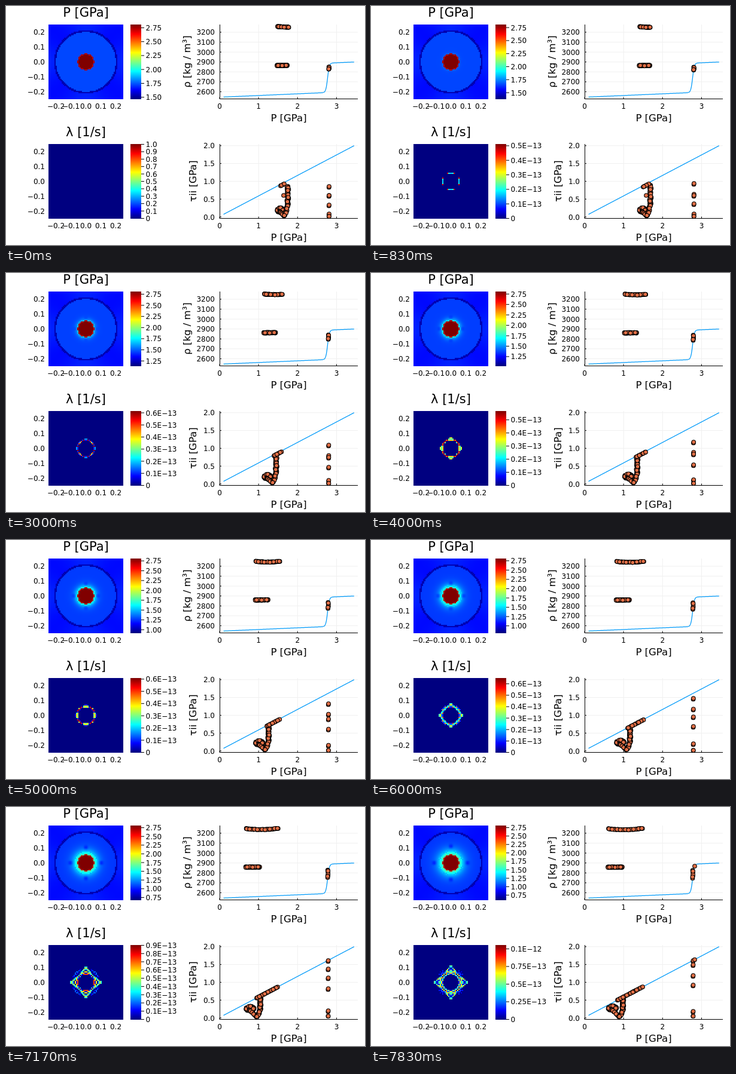
Write an HTML page with a canvas that moves like this. It is 600 by 400 pixels and loops after 8 s.

```html
<!DOCTYPE html>
<html lang="en">
<head>
<meta charset="utf-8">
<title>Pressure, density and stress</title>
<style>
  html, body { margin: 0; width: 100%; height: 100%; overflow: hidden; background: #fff; }
  canvas { display: block; width: 600px; height: 400px; }
</style>
</head>
<body>
<canvas id="stage" width="600" height="400"></canvas>
<script>
const ctx = document.getElementById('stage').getContext('2d');
const LOOP = 8000, STEPS = 48, N = 62;
const FONT = 'px "DejaVu Sans", sans-serif';

// Values at the steps listed in KEYS, linear in between.
const KEYS = [0, 5, 12, 24, 36, 43, 47];
const TRACKS = {
  pMin: [1.47, 1.38, 1.25, 1.027, 0.81, 0.68, 0.607],
  column: [471, 467, 458, 445, 433, 425, 421],
  columnTop: [302, 300, 302, 308, 315, 318, 320],
  ringRight: [473, 467, 465, 460, 457, 456, 455],
  yieldLeft: [459, 455, 453, 443, 429, 419, 412],
  rateMax: [0.51, 0.51, 0.66, 0.565, 0.648, 0.9, 1.05],
  reach: [7, 7, 7, 9, 10, 12.5, 13.5],
  halo: [0, 0.04, 0.12, 0.24, 0.31, 0.34, 0.35],
  haloWidth: [1, 1, 1.2, 1.6, 2.5, 3.2, 3.6]
};
const CORE = [
  [302, 297, 293, 283, 265, 257, 257],
  [317, 315, 311, 300, 283, 271, 264],
  [317, 317, 314, 303, 296, 286, 282],
  [333, 331, 329, 321, 312, 304, 298],
  [348, 348, 348, 346, 341, 341, 342],
  [352, 352, 352, 352, 352, 350, 350]
];

const clamp = (v, a = 0, b = 1) => Math.min(b, Math.max(a, v));
const mix = (a, b, f) => a + (b - a) * f;

function sample(values, k) {
  let i = 0;
  while (i < KEYS.length - 2 && k > KEYS[i + 1]) i++;
  return mix(values[i], values[i + 1], clamp((k - KEYS[i]) / (KEYS[i + 1] - KEYS[i])));
}

function hash(a, b, c = 0) {
  const s = Math.sin(a * 127.1 + b * 311.7 + c * 74.7) * 43758.5453;
  return s - Math.floor(s);
}

function jet(v) {
  const part = c => Math.round(255 * clamp(1.5 - Math.abs(4 * v - c)));
  return [part(3), part(2), part(1)];
}

const px = p => 357 + 65.15 * p;
const densityY = d => 143.5 - (d - 2600) * 0.166;
const stressY = s => 353 - 59.6 * s;
const density = p => 2545 + 17 * p + 148 * (1 + Math.tanh((p - 2.77) / 0.045));
const yieldStress = p => 0.0145 + 0.5755 * p;

function text(str, x, y, size = 12, align = 'center') {
  ctx.font = size + FONT;
  ctx.textAlign = align;
  ctx.textBaseline = 'alphabetic';
  ctx.fillStyle = '#000';
  ctx.fillText(str, x, y);
}

function sideText(str, x, y) {
  ctx.save();
  ctx.translate(x, y);
  ctx.rotate(-Math.PI / 2);
  text(str, 0, 0, 16.5);
  ctx.restore();
}

function line(x1, y1, x2, y2, color = '#000') {
  ctx.strokeStyle = color;
  ctx.lineWidth = 1;
  ctx.beginPath();
  ctx.moveTo(x1, y1);
  ctx.lineTo(x2, y2);
  ctx.stroke();
}

function dot(x, y) {
  ctx.beginPath();
  ctx.arc(x, y, 3.3, 0, 7);
  ctx.fillStyle = '#e26f46';
  ctx.fill();
  ctx.strokeStyle = '#000';
  ctx.lineWidth = 1.1;
  ctx.stroke();
}

// Calls place(f) for count fractions of 0..1 in a scattered order.
function scatter(count, place) {
  for (let i = 0; i < count; i++) place((i * 0.618034) % 1, i);
}

const grid = document.createElement('canvas');
grid.width = grid.height = N;
const gridCtx = grid.getContext('2d');
const cells = gridCtx.createImageData(N, N);

function heatmap(top, field) {
  for (let j = 0, o = 0; j < N; j++) {
    for (let i = 0; i < N; i++, o += 4) {
      const x = Math.abs(i - N / 2 + 0.5), y = Math.abs(j - N / 2 + 0.5);
      cells.data.set([...jet(clamp(field(x, y))), 255], o);
    }
  }
  gridCtx.putImageData(cells, 0, 0);
  ctx.imageSmoothingEnabled = false;
  ctx.drawImage(grid, 71, top, 125, 125);
}

function mapFrame(title, top) {
  text(title, 133.5, top - 13, 21);
  for (let i = -2; i <= 2; i++) {
    const label = (i < 0 ? '−' : '') + Math.abs(i / 10).toFixed(1);
    text(label, 133.5 + 25 * i, top + 141);
    text(label, 65, top + 66.5 - 25 * i, 12, 'right');
  }
}

function colorbar(top, ticks) {
  for (let y = 0; y < 125; y++) {
    ctx.fillStyle = `rgb(${jet(1 - y / 124)})`;
    ctx.fillRect(208, top + y, 18, 1);
  }
  for (const [f, label] of ticks) {
    const y = top + 124.5 - 124 * f;
    line(226, y, 231, y);
    text(label, 233.5, y + 4.5, 12, 'left');
  }
}

function plotFrame(top, yTicks, yOf, format) {
  const bottom = top + 124.5;
  for (let p = 0; p <= 3; p++) {
    if (p) line(px(p), top, px(p), bottom, '#f0f0f0');
    text(String(p), px(p), top + 141);
  }
  for (const v of yTicks) {
    line(357, yOf(v), 588, yOf(v), '#f0f0f0');
    text(format(v), 349, yOf(v) + 4.5, 12, 'right');
  }
  for (let p = 0; p <= 3; p++) line(px(p), bottom, px(p), bottom - 3);
  for (const v of yTicks) line(357, yOf(v), 360, yOf(v));
  line(357.5, top, 357.5, bottom + 0.5);
  line(357, bottom, 588, bottom);
  text('P [GPa]', 472.5, top + 161.5, 16.5);
}

function curve(fn, yOf) {
  ctx.strokeStyle = '#009af9';
  ctx.lineWidth = 1.25;
  ctx.beginPath();
  for (let p = 0.1; p <= 3.451; p += 0.01) ctx.lineTo(px(p), yOf(fn(p)));
  ctx.stroke();
}

function pressure(s, k) {
  return (x, y) => {
    const r = Math.hypot(x, y), u = Math.max(x, y), v = Math.min(x, y);
    if (r < 6.6) return r > 5.9 ? 0.95 : 1;
    if (Math.abs(r - 25.5) < 0.8) return 0.05;
    if (r > 25.5) return 0.145 + 0.012 * Math.cos(4 * Math.atan2(y, x));
    const d = (r - 6.6) / s.haloWidth;
    const rough = 1 + 0.4 * (hash(u, v) - 0.5) * (d < 1 ? 1 : 0);
    const tip = 0.07 * Math.min(1, k / 40) * Math.exp(-((u - s.reach) ** 2) / 3 - v * v / 2);
    return 0.195 - 0.02 * s.p + s.halo * rough * Math.exp(-d) - tip;
  };
}

function strainRate(s, k) {
  return (x, y) => {
    if (!k) return 0;
    const u = Math.max(x, y), v = Math.min(x, y), r = Math.hypot(x, y);
    const n = hash(u, v, k >> 1);
    if (k < 16) {
      if (u !== 6.5 || v > 2.5) return 0;
      return v === 2.5 ? 0.9 : 0.38 - 0.012 * k + 0.15 * n;
    }
    if (r < 6.3) return 0;
    const star = u + 1.3 * v;
    if (k > 38 && Math.abs(star - s.reach) < 0.8) return 0.3 + 0.35 * n;
    const ring = 6.3 + 2.4 * s.p;
    if (star <= s.reach + 0.5 || r < ring) {
      return n ** 1.4 * clamp(1.1 - (r - 6.3) / 7);
    }
    return k > 30 && r < s.reach - 1 && v / u > 0.4 && n > 0.4 ? 0.25 * n : 0;
  };
}

function rateTicks(k, max) {
  const ticks = [[0, '0']];
  if (!k) {
    for (let i = 1; i <= 10; i++) ticks.push([i / 10, (i / 10).toFixed(1)]);
    return ticks;
  }
  const unit = max > 0.96 ? 0.25 : 0.1;
  for (let i = 1; i * unit <= max + 0.002; i++) {
    const v = +(i * unit).toFixed(2);
    ticks.push([v / max, v === 1 ? '0.1E−12' : v + 'E−13']);
  }
  return ticks;
}

function densityDots(s, k) {
  const ringLeft = s.column - 17 - 7 * s.p, left = s.column - 18 - 7 * s.p;
  scatter(44, (f, i) => {
    const sag = 8 * s.p * f * (1 - f);
    dot(mix(ringLeft, s.ringRight, f), 34.5 + 2 * s.p + sag + (1 - 2 * s.p) * f + hash(i, 2) - 0.5);
  });
  scatter(40, (f, i) => {
    dot(mix(left, s.column - 0.5, f), 99.5 + 1.2 * s.p + 1.4 * (hash(i, 7) - 0.5));
  });
  scatter(7, (f, i) => {
    dot(540 - 2 * s.p + 1.6 * (hash(i, 9) - 0.5), mix(102 + 4 * s.p, 106.5 + 15 * s.p, f));
  });
  if (k > 45) dot(541, 99);
}

function stressDots(s, k) {
  const c = s.column, foot = c - 6;
  const heapX = c - 13 - 5 * s.p, heapY = 342 - 5 * s.p * s.p;
  scatter(44, (f, i) => {
    const a = 6.283 * hash(i, 11), r = Math.sqrt(f);
    dot(heapX + (6 + 2 * s.p) * r * Math.cos(a), heapY + 4.5 * r * Math.sin(a));
  });
  scatter(10, (f, i) => {
    dot(mix(heapX, foot, f), mix(heapY + 2, 351.5, f) + 2 * (hash(i, 15) - 0.5));
  });
  scatter(56, (f, i) => {
    dot(c - 6 * f ** 5 + 3 * (hash(i, 17) - 0.5), mix(s.columnTop, 351, f));
  });
  if (k < 9) dot(c - 7, 317);
  const right = Math.min(466, s.ringRight);
  scatter(Math.max(4, Math.round((right - s.yieldLeft) / 1.8)), f => {
    const x = mix(s.yieldLeft, right, f);
    dot(x, stressY(yieldStress((x - 357) / 65.15)) + 2.5 * (1 - s.p));
  });
  CORE.forEach((track, i) => {
    const y = sample(track, k);
    dot(539.7 - 1.5 * s.p, y + (i < 5 ? 1.5 : 0));
    dot(540 - 1.5 * s.p, y);
  });
  if (k > 45) dot(541, 255.5);
}

function draw(k) {
  const s = { p: k / (STEPS - 1) };
  for (const name in TRACKS) s[name] = sample(TRACKS[name], k);

  ctx.fillStyle = '#fff';
  ctx.fillRect(0, 0, 600, 400);

  heatmap(31, pressure(s, k));
  mapFrame('P [GPa]', 31);
  const pTicks = [];
  for (let v = 2.75; v >= s.pMin - 0.002; v -= 0.25) {
    pTicks.push([(v - s.pMin) / (2.803 - s.pMin), v.toFixed(2)]);
  }
  colorbar(31, pTicks);

  heatmap(231, strainRate(s, k));
  mapFrame('λ [1/s]', 231);
  colorbar(231, rateTicks(k, s.rateMax));

  plotFrame(31, [2600, 2700, 2800, 2900, 3000, 3100, 3200], densityY, String);
  sideText('ρ [kg / m³]', 308, 93);
  curve(density, densityY);
  densityDots(s, k);

  plotFrame(231, [0, 0.5, 1, 1.5, 2], stressY, v => v.toFixed(1));
  sideText('τii [GPa]', 318, 293);
  curve(yieldStress, stressY);
  stressDots(s, k);
}

let shown = -1;
function tick() {
  const t = performance.now() % LOOP;
  const k = Math.floor((t + 4) * STEPS / LOOP) % STEPS;
  if (k !== shown) draw(shown = k);
  requestAnimationFrame(tick);
}
tick();
</script>
</body>
</html>
```
